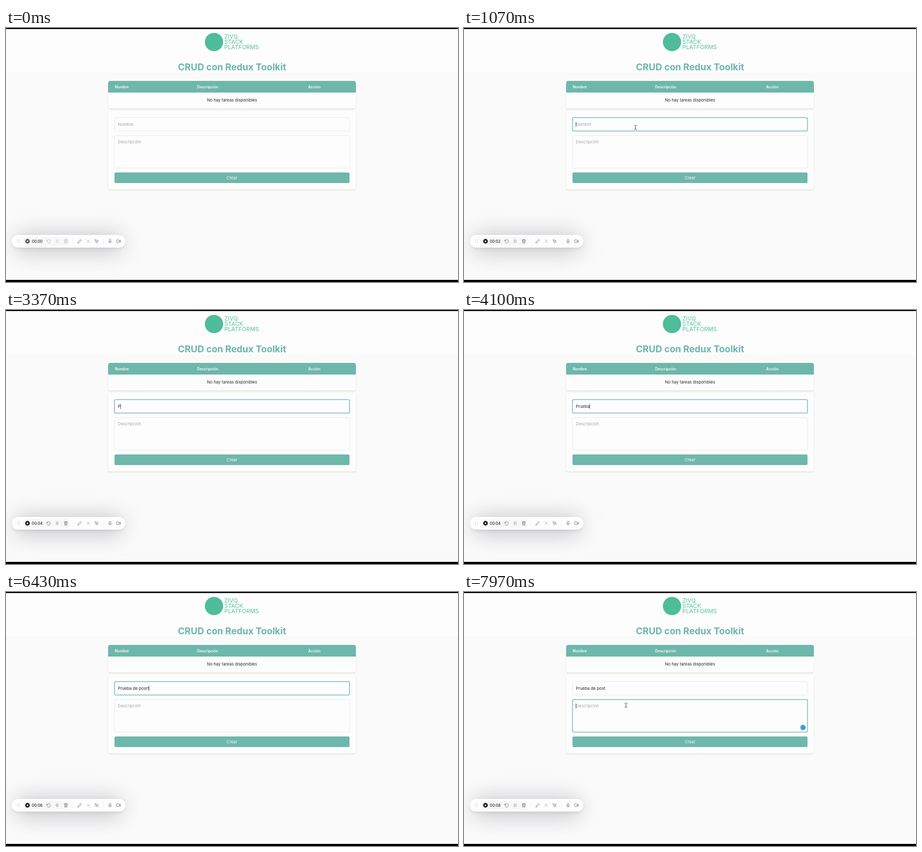
Write an HTML page that moves like this. It is 854x480 px and loops after 8000 ms.

```html
<!DOCTYPE html>
<html lang="es">
<head>
<meta charset="utf-8">
<title>CRUD con Redux Toolkit</title>
<style>
html, body { margin: 0; width: 100%; height: 100%; overflow: hidden; background: #fafafb; }
svg { display: block; width: 100vw; height: 100vh; }
text { font-family: Inter, "Open Sans", sans-serif; font-size: 7.75px; fill: #27272a; white-space: pre; }
.brand { font-size: 10.9px; fill: #57c1a0; }
.title { font-size: 17.4px; font-weight: 700; fill: #6cb6aa; }
.head { font-size: 6.9px; font-weight: 600; fill: #fdfdfa; }
.hint { fill: #a4a5aa; }
.timer { font-size: 7.1px; font-weight: 500; font-variant-numeric: tabular-nums; }
.mid { text-anchor: middle; }
.teal { fill: #6eb7ab; }
.card { fill: #fdfdfd; }
.field { fill: #fdfdfd; stroke: #e2e4e2; stroke-width: .7; }
.focus { stroke: #6cb5ab; stroke-width: 1.3; }
.icon { fill: none; stroke: #75757a; stroke-width: .8; stroke-linecap: round; stroke-linejoin: round; }
</style>
</head>
<body>
<svg viewBox="0 0 854 480" preserveAspectRatio="none">
  <defs>
    <filter id="glow" x="-60%" y="-400%" width="220%" height="900%"><feGaussianBlur stdDeviation="20"/></filter>
    <filter id="soft" x="-10%" y="-50%" width="120%" height="200%"><feGaussianBlur stdDeviation="3"/></filter>
    <filter id="lift" x="-5%" y="-10%" width="110%" height="130%">
      <feDropShadow dx="0" dy="1.3" stdDeviation="1.1" flood-color="#c9cab4" flood-opacity=".6"/>
    </filter>
  </defs>

  <rect width="854" height="480" fill="#fafafb"/>
  <rect width="854" height="84" fill="#fdfdfd"/>
  <rect width="854" height="2"/>

  <circle cx="393" cy="26.5" r="17.3" fill="#4fbd9a"/>
  <text class="brand" x="412.5" y="19.6">ZIVQ</text>
  <text class="brand" x="412.5" y="30">STACK</text>
  <text class="brand" x="412.5" y="40.4">PLATFORMS</text>
  <text class="title mid" x="427" y="79.5">CRUD con Redux Toolkit</text>

  <rect class="card" x="193" y="100" width="468" height="52" rx="4" filter="url(#lift)"/>
  <path class="teal" d="M193 122V104a4 4 0 0 1 4-4H657a4 4 0 0 1 4 4V122Z"/>
  <text class="head" x="205.5" y="113.6">Nombre</text>
  <text class="head" x="361" y="113.6">Descripción</text>
  <text class="head" x="571" y="113.6">Acción</text>
  <text class="mid" x="427" y="139.2">No hay tareas disponibles</text>

  <rect class="card" x="193" y="157" width="468" height="148" rx="4" filter="url(#lift)"/>
  <rect id="nameField" class="field" x="205" y="169.3" width="444" height="25.4" rx="2.5"/>
  <rect id="textField" class="field" x="205" y="203.3" width="444" height="61.5" rx="2.5"/>
  <text id="nameHint" class="hint" x="211.3" y="185">Nombre</text>
  <text id="nameText" x="211.3" y="185"></text>
  <text class="hint" x="211.3" y="218.3">Descripción</text>
  <rect class="teal" x="205" y="273" width="444" height="20" rx="2.5"/>
  <text class="mid" x="427" y="285.8" style="fill:#fdfdfa">Crear</text>
  <circle id="badge" cx="640.5" cy="256" r="5" fill="#379dda"/>
  <rect id="caret" width=".8" height="9.5" fill="#3c3c40"/>

  <rect x="16" y="390" width="205" height="34" rx="16" fill="#98989c" opacity=".55" filter="url(#glow)"/>
  <rect x="13" y="393" width="211" height="24" rx="12" fill="#88888c" opacity=".25" filter="url(#soft)"/>
  <rect x="11" y="391" width="214.5" height="24" rx="12" fill="#fefefe"/>
  <rect x="33" y="395" width="87" height="16" rx="4" fill="#f7f7f7"/>
  <path class="icon" d="M22 400.5h0M25.2 400.5h0M22 403h0M25.2 403h0M22 405.5h0M25.2 405.5h0"/>
  <g id="record"><circle cx="40.6" cy="403" r="4.4" fill="#1c1c1e"/><circle cx="40.6" cy="403" r="1.5" fill="#fdfdfd"/></g>
  <text id="timer" class="timer" x="48.8" y="405.6"></text>
  <g id="controls" class="icon">
    <path d="M77 400.3v2.4h2.4M77.2 402.4a3.4 3.4 0 1 1 .4 2.7"/>
    <path d="M95.2 400.2v5.6M98 400.2v5.6"/>
    <path d="M109.7 400.8h6.6M111.6 400.8v-1.2h2.8v1.2M110.5 401l.3 5.4h4.4l.3-5.4M112.2 402.6v2.2M113.8 402.6v2.2"/>
  </g>
  <path d="M126.5 396v14M184.5 396v14" stroke="#eeeeef" stroke-width=".8"/>
  <g class="icon">
    <path d="M135.8 406.3l.6-2.3 4.5-4.5 1.7 1.7-4.5 4.5Z"/>
    <path d="M153.3 403h4M155.3 401v4M152 400.3h.2M158.4 400.3h.2M152 405.7h.2M158.4 405.7h.2" stroke="#b0b0b4"/>
    <path d="M168.3 399.8l6 2.3-2.6 1-1 2.7ZM172.3 404l2 2.2"/>
    <rect x="195.2" y="399.2" width="2.6" height="4.6" rx="1.3"/>
    <path d="M193.8 402.8a2.7 2.7 0 0 0 5.4 0M196.5 405.5v1.2"/>
    <rect x="208.8" y="400.4" width="5" height="5.2" rx="1"/>
    <path d="M213.8 402.4l2.6-1.4v4l-2.6-1.4"/>
  </g>
  <rect y="476" width="854" height="4"/>

  <path id="pointer" fill="none" stroke="#48484c" d="M-2.4-4q1.9 0 2.4 1.2q.5-1.2 2.4-1.2M0-3V3M-2.4 4q1.9 0 2.4-1.2q.5 1.2 2.4 1.2"/>
</svg>
<script>
const LOOP = 8000, NAME_FOCUS = 800, TEXT_FOCUS = 7650;
const el = id => document.getElementById(id);
const show = (id, on) => el(id).style.display = on ? '' : 'none';

// [time, key], where '<' is backspace
const keys = [
  [3200, 'P'], [3450, 'r'], [3600, 'u'], [3760, 'e'], [3900, 'b'], [4050, 'a'],
  [4160, ' '], [4260, 'd'], [4420, 'e'], [5120, ' '], [5270, 'p'], [5450, 'o'],
  [5650, 's'], [6000, 'r'], [6240, 't'], [6760, '<'], [6910, '<'], [7060, 't']
];

// Each stretch of pointer movement: [time, x, y]
const moves = [
  [[60, 396, 190], [300, 377, 184], [850, 324, 188], [3200, 324, 188]],
  [[7250, 312, 184], [7480, 311, 186], [7720, 306, 214], [8000, 306, 214]]
];

function pointerAt(t) {
  const path = moves.find(m => t >= m[0][0] && t < m.at(-1)[0]);
  if (!path) return null;
  const i = path.findIndex(p => p[0] > t);
  const [t0, x0, y0] = path[i - 1], [t1, x1, y1] = path[i];
  const u = (t - t0) / (t1 - t0), e = u * u * (3 - 2 * u);
  return [x0 + (x1 - x0) * e, y0 + (y1 - y0) * e];
}

function typedAt(t) {
  let text = '', last = NAME_FOCUS;
  for (const [time, key] of keys) {
    if (time > t) break;
    text = key === '<' ? text.slice(0, -1) : text + key;
    last = time;
  }
  return { text, last };
}

function draw(t) {
  const { text, last } = typedAt(t);
  const inText = t >= TEXT_FOCUS, inName = t >= NAME_FOCUS && !inText;
  el('nameText').textContent = text;
  show('nameHint', !text);
  el('nameField').classList.toggle('focus', inName);
  el('textField').classList.toggle('focus', inText);
  show('badge', inText);

  const blinkStart = inText ? TEXT_FOCUS : last;
  show('caret', (inName || inText) && (t - blinkStart) % 1000 < 500);
  const width = inName && text ? el('nameText').getComputedTextLength() : 0;
  el('caret').setAttribute('x', 211 + width);
  el('caret').setAttribute('y', inText ? 210.7 : 177.4);

  const seconds = t < 40 ? 0 : t < 1000 ? 1 : Math.floor(2 + (t - 1000) / 1090);
  el('timer').textContent = '00:0' + seconds;
  const ready = Math.min(1, t / 180);
  el('controls').style.opacity = .45 + .55 * ready;
  el('record').style.opacity = .7 + .3 * ready;

  const spot = pointerAt(t);
  show('pointer', spot);
  if (spot) el('pointer').setAttribute('transform', `translate(${spot})`);
}

const start = performance.now();
function tick() {
  draw((performance.now() - start) % LOOP);
  requestAnimationFrame(tick);
}
tick();
</script>
</body>
</html>
```
